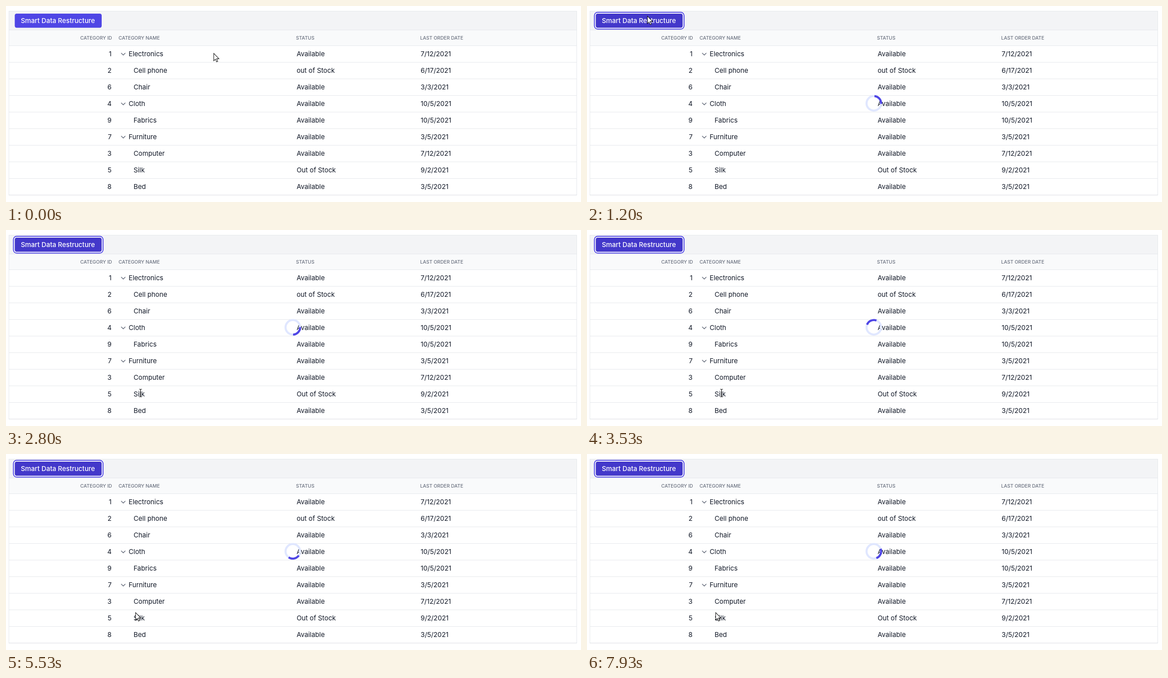
Recreate the animation shown at these times as an HTML page. Size 1280 by 437 pixels, loop 8 s.

```html
<!DOCTYPE html>
<html lang="en">
<head>
<meta charset="utf-8">
<title>Smart Data Restructure</title>
<style>
  html, body { margin: 0; width: 100%; height: 100%; overflow: hidden; background: #fff; }
  svg { display: block; width: 1280px; height: 437px; font-family: Inter, sans-serif; }
  .cell { font-size: 14.8px; fill: #111827; }
  .head { font-size: 10.6px; fill: #6b7280; font-weight: 500; }
  .end { text-anchor: end; }
  .line { stroke: #e5e7eb; stroke-width: 1; fill: none; }
  .chevron { stroke: #6b7280; stroke-width: 1.6; fill: none; stroke-linecap: round; stroke-linejoin: round; }
</style>
</head>
<body>
<svg viewBox="0 0 1280 437">
  <rect x="6" y="11" width="1265" height="42" fill="#f3f4f6"/>
  <rect x="6" y="54" width="1265" height="34" fill="#f9fafb"/>
  <g id="grid"></g>
  <rect class="line" x="6.5" y="11.5" width="1264" height="410"/>
  <path d="M6 421.5H1271" stroke="#d9dce1"/>

  <g id="ring">
    <rect x="15.5" y="13" width="201.5" height="39.5" rx="8.4" fill="#4f46e5"/>
    <rect x="17.5" y="15" width="197.5" height="35.5" rx="6.3" fill="#fff"/>
  </g>
  <rect id="button" x="19.5" y="17" width="193.5" height="31.5" rx="4.2"/>
  <text x="33" y="38" font-size="14.8" font-weight="500" fill="#fff">Smart Data Restructure</text>

  <g id="spinner" transform="translate(638.5 217)" fill="none" stroke-width="4.6">
    <circle r="16.2" stroke="#e0e7ff"/>
    <path id="arc" d="M-11.46 -11.46A16.2 16.2 0 0 1 11.46 -11.46" stroke="#4f46e5"/>
  </g>

  <path id="arrow" d="M.5 .7V17.2L4.2 13.6L6.8 19.5L9.4 18.4L6.9 12.6H12.1Z" fill="#fff" stroke="#111" stroke-width="1.1"/>
  <path id="beam" d="M-3 -8.5H-1L0 -7.5L1 -8.5H3M0 -7.5V7.5M-3 8.5H-1L0 7.5L1 8.5H3" fill="none" stroke="#111" stroke-width="1.2"/>
</svg>
<script>
const $ = id => document.getElementById(id);
const NS = "http://www.w3.org/2000/svg";
const LOOP = 8000, FPS = 15, SPIN = 1300;

function add(tag, attrs, text = "") {
  const el = document.createElementNS(NS, tag);
  for (const name in attrs) el.setAttribute(name, attrs[name]);
  el.textContent = text;
  $("grid").append(el);
}
const label = (cls, x, y, text) => add("text", { class: cls, x, y }, text);
const rule = y => add("path", { class: "line", d: `M6 ${y}H1271` });

// id, name, status, last order, has children
const rows = [
  [1, "Electronics", "Available", "7/12/2021", true],
  [2, "Cell phone", "out of Stock", "6/17/2021"],
  [6, "Chair", "Available", "3/3/2021"],
  [4, "Cloth", "Available", "10/5/2021", true],
  [9, "Fabrics", "Available", "10/5/2021"],
  [7, "Furniture", "Available", "3/5/2021", true],
  [3, "Computer", "Available", "7/12/2021"],
  [5, "Silk", "Out of Stock", "9/2/2021"],
  [8, "Bed", "Available", "3/5/2021"]
];

rule(53.5);
rule(88.5);
label("head end", 236, 75, "CATEGORY ID");
label("head", 250.5, 75, "CATEGORY NAME");
label("head", 645.5, 75, "STATUS");
label("head", 922, 75, "LAST ORDER DATE");
rows.forEach(([id, name, status, date, parent], i) => {
  const mid = 107 + 37 * i, base = mid + 5.3;
  label("cell end", 235, base, id);
  label("cell", parent ? 273 : 284, base, name);
  label("cell", 647, base, status);
  label("cell", 923, base, date);
  if (parent) add("path", { class: "chevron", d: `M256.8 ${mid - 1.8}l4.2 4.2l4.2 -4.2` });
  if (i < rows.length - 1) rule(mid + 18.5);
});

const ease = t => t * t * (3 - 2 * t);
const clamp = t => Math.min(1, Math.max(0, t));

// Each move eases the pointer to a new place between two steps.
const home = { x: 462, y: 105 };
const moves = [
  { from: 0, to: 7, x: 134, y: 22 },
  { from: 18, to: 36, x: 299.5, y: 338 },
  { from: 36, to: 40, x: 299.5, y: 373 },
  { from: 40, to: 42, x: 299.5, y: 363.5 },
  { from: 67, to: 68, x: 289, y: 353 }
];

function pointer(step) {
  let { x, y } = home;
  for (const m of moves) {
    const f = ease(clamp((step - m.from) / (m.to - m.from)));
    x += (m.x - x) * f;
    y += (m.y - y) * f;
  }
  const drift = Math.max(0, Math.floor((step - 67) / 14));
  return [x - drift, y];
}

const show = (id, on) => $(id).setAttribute("visibility", on ? "visible" : "hidden");

function draw(ms) {
  const step = Math.floor((ms + 5) * FPS / 1000);
  const time = step * 1000 / FPS;
  const overText = step >= 35 && step < 68;
  show("arrow", !overText);
  show("beam", overText);
  $(overText ? "beam" : "arrow").setAttribute("transform", `translate(${pointer(step)})`);
  $("button").setAttribute("fill", step >= 5 ? "#4338ca" : "#4f46e5");
  show("ring", step >= 11);
  show("spinner", step >= 12);
  $("arc").setAttribute("transform", `rotate(${50 + (time - 1200) * 360 / SPIN})`);
}

let start;
function tick(now) {
  start ??= now;
  draw((now - start) % LOOP);
  requestAnimationFrame(tick);
}
draw(0);
requestAnimationFrame(tick);
</script>
</body>
</html>
```
